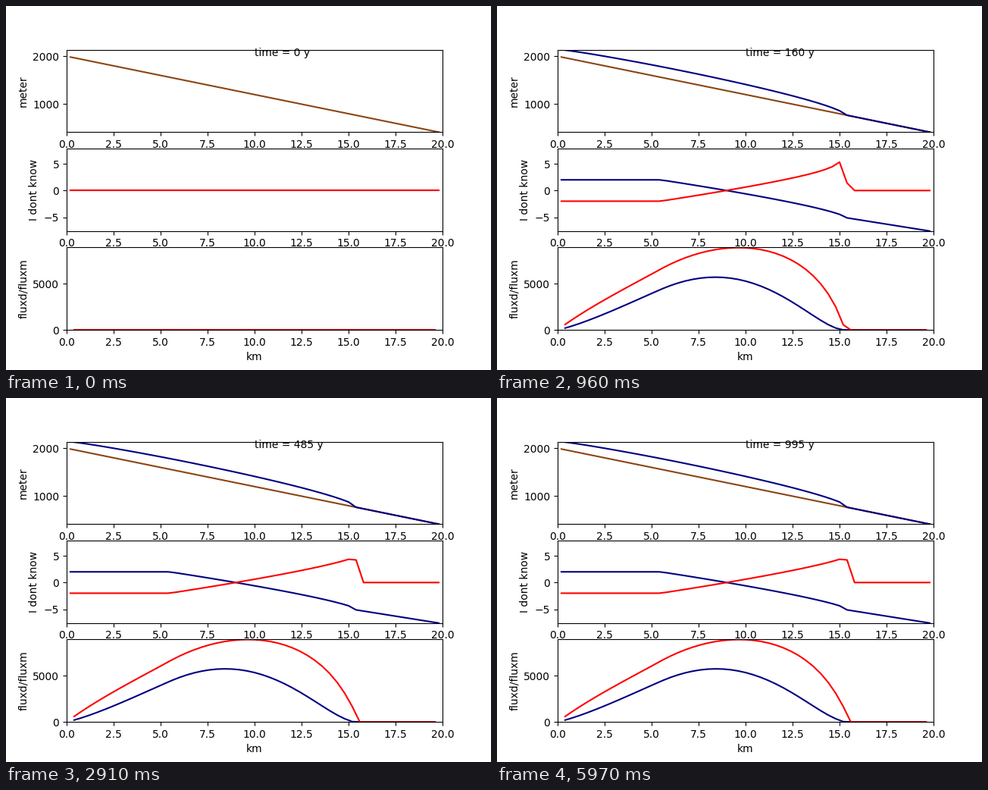
Recreate the animation shown at these times as a matplotlib script. Size 640 by 480 pixels, loop 6000 ms.

```python
import numpy as np
import matplotlib.pyplot as plt
from matplotlib.animation import FuncAnimation

# One-dimensional valley glacier on a plane bed (metres, years)
YEAR = 365 * 24 * 3600
RHO_G3 = (920 * 9.81) ** 3
DEFORM = 0.4 * 1.9e-24 * YEAR * RHO_G3
SLIDE = 5.7e-20 * YEAR * RHO_G3
ELA, GRADIENT, MAX_BALANCE = 1500, 0.007, 2

N, DX, DT = 50, 400.0, 0.05
YEARS_PER_FRAME, FRAMES = 5, 200

x = DX * (np.arange(N) + 0.5)
x_edge = DX * np.arange(1, N)
bed = 2000 - 0.08 * x


def balance(z):
    return np.minimum(GRADIENT * (z - ELA), MAX_BALANCE)


def fluxes(h):
    """Deformation and sliding flux at the inner cell edges."""
    z = bed + h
    slope = (z[..., :-1] - z[..., 1:]) / DX
    mid = 0.5 * (h[..., :-1] + h[..., 1:])
    hs = mid * slope
    base = hs * hs * hs
    return DEFORM * base * mid * mid, SLIDE * base


def convergence(q):
    padded = np.zeros(q.shape[:-1] + (N + 1,))
    padded[..., 1:-1] = q
    return (padded[..., :-1] - padded[..., 1:]) / DX


def grow(years):
    steps = round(years / DT)
    out = np.zeros((steps, N))
    h = np.zeros(N)
    for k in range(steps):
        out[k] = h
        deform, slide = fluxes(h)
        rate = balance(bed + h) + convergence(deform + slide)
        h = np.maximum(h + DT * rate, 0)
    return out


# The clock reads 75 y when the tongue reaches 14.4 km
history = grow(1600)
tip = sum(fluxes(history))[:, 35]
start = np.argmax(tip > 1200) - round(75 / DT)
picks = start + np.arange(FRAMES) * round(YEARS_PER_FRAME / DT)
thick = history[np.clip(picks, 0, len(history) - 1)]

surface = bed + thick
mass = balance(surface)
deform, slide = fluxes(thick)
conv = convergence(deform + slide)
for series in (surface, mass, deform, slide, conv):
    series[0] = 0

fig, axes = plt.subplots(3, 1, figsize=(6.4, 4.8), dpi=100)
top, middle, bottom = axes


def curve(ax, xs, color):
    return ax.plot(xs / 1000, np.zeros_like(xs), color=color)[0]


top.plot(x / 1000, bed, color="saddlebrown")
curves = [
    (curve(top, x, "navy"), surface),
    (curve(middle, x, "navy"), mass),
    (curve(middle, x, "red"), conv),
    (curve(bottom, x_edge, "navy"), deform),
    (curve(bottom, x_edge, "red"), slide),
]
clock = top.text(10, 2000, "")

panels = [
    ("meter", (bed.min(), surface.max()), (1000, 2000)),
    ("I dont know", (mass.min(), 7.85), (-5, 0, 5)),
    ("fluxd/fluxm", (0, slide.max()), (0, 5000)),
]
for ax, (label, limits, ticks) in zip(axes, panels):
    ax.set_xlim(0, 20)
    ax.set_ylim(*limits)
    ax.set_yticks(ticks)
    ax.set_ylabel(label)
bottom.set_xlabel("km")


def update(i):
    for line, series in curves:
        line.set_ydata(series[i])
    clock.set_text(f"time = {i * YEARS_PER_FRAME} y")
    return [line for line, _ in curves] + [clock]


anim = FuncAnimation(fig, update, frames=FRAMES, interval=30, repeat=True)
plt.show()
```
